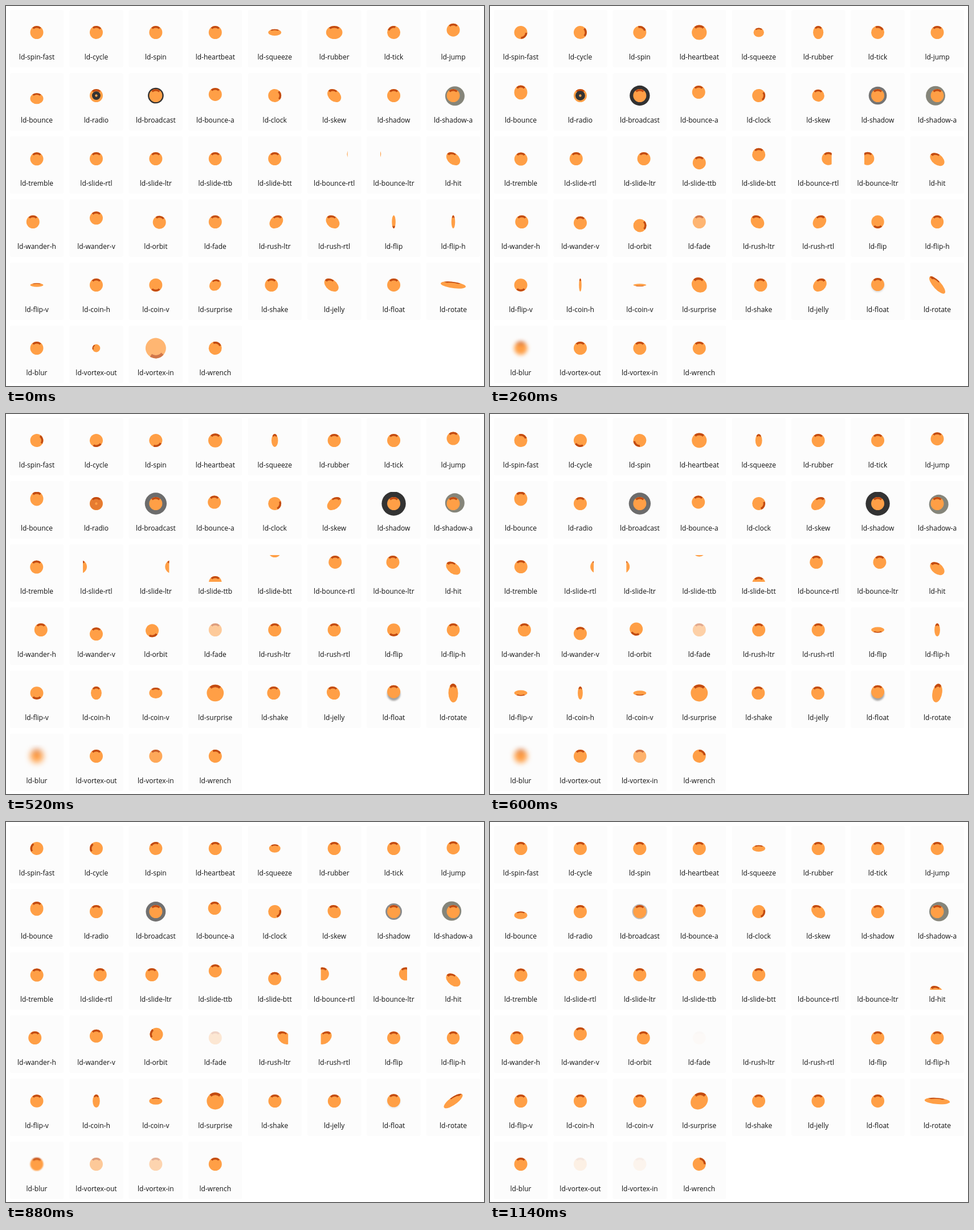
Animation of 839x668 px, one loop 1.16 s. Source, as an HTML page:

```html
<!DOCTYPE html>
<html lang="en">
<head>
<meta charset="utf-8">
<title>Transition gallery</title>
<style>
html, body { margin: 0; width: 100%; height: 100%; overflow: hidden; background: #fff; }
svg { display: block; width: 839px; height: 668px; }
text { font: 12px "Open Sans", "Noto Sans", sans-serif; fill: #111; text-anchor: middle; }
</style>
</head>
<body>
<svg id="stage" viewBox="0 0 839 668">
  <defs>
    <clipPath id="box"><rect x="-23.5" y="-20.5" width="47" height="47"/></clipPath>
  </defs>
</svg>
<script>
const LOOP = 1160, STEP = 20, TAU = Math.PI * 2;
const R = 11.5;
const { sin, cos, abs, exp, min, max, PI } = Math;

// Clocks: steady share of the loop, and a quicker one for eased motion
const clamp = v => max(0, min(1, v));
const share = t => .02 + t / LOOP;
const quick = t => clamp(t / 1020 - .035);

// Shapes over time
const easeInOut = (u, n) => u < .5 ? (2 * u) ** n / 2 : 1 - (2 - 2 * u) ** n / 2;
const easeOut = (u, n) => 1 - (1 - clamp(u)) ** n;
const bump = (t, mid, width) => exp(-(((t - mid) / width) ** 2));
const plateau = (t, mid, width) => exp(-(abs((t - mid) / width) ** 3));

const turn = t => easeInOut(quick(t), 2.3);
const wave = t => cos(TAU * quick(t));
const spring = t => cos(TAU * (t - 20) / 400) * exp(-((t / 500) ** 8));
const shake = t => -5.8 * exp(-t / 450) * cos(TAU * t / 520);
const wander = t => -7.3 * cos(TAU * (t + 75) / LOOP);
const across = t => 35.3 - 72 * share(t);
const arch = t => -8.2 * abs(cos(TAU * share(t)));
const exit = t => .12 * max(0, t - 740);
const lift = t => bump(t, 550, 300);
const vortex = t => max(0, 1 - t / 240) ** 2;
const gray = g => `rgb(${g},${g},${g})`;
const both = s => ({ sx: s, sy: s });

// Accelerates out of one side, then brakes in from the other
function slide(t) {
  const u = min(1, (t + 8) / 1148);
  return u < .5 ? 33 * (2 * u) ** 2 : -33 * (2 - 2 * u) ** 2;
}

const circle = (t, r, n = 1) => ({
  x: r * cos(TAU * n * share(t)),
  y: r * sin(TAU * n * share(t))
});

function jump(t) {
  return { y: -4.3 * (1 - (t / LOOP) ** 2) * abs(cos(PI * t / 520)) };
}

function bounce(t) {
  const v = abs(t - 560) / 580;
  return { y: -8.5 + 15 * v ** 2.5, sy: 1.08 - .5 * v ** 20 };
}

function heartbeat(t) {
  return both(1 + .14 * bump(t, 260, 80) - .09 * bump(t, 420, 60) + .14 * bump(t, 620, 120));
}

// Dark disc that widens, reddens and fades
function radio(t) {
  const u = clamp((t - 260) / 160);
  const mix = (a, b) => a + (b - a) * u;
  return {
    r: min(R, 7.5 + 2.5 * (t / 420) ** 2),
    fill: `rgb(${mix(51, 194)},${mix(51, 74)},${mix(51, 18)})`,
    o: 1 - clamp((t - 420) / 170)
  };
}

function broadcast(t) {
  const level = (t < 340 ? 50 : 108) + 80 * clamp((t - 800) / 340) ** 2;
  return { r: 13.2 + 6 * abs(sin(PI * share(t))) ** .8, fill: gray(level) };
}

function glow(t) {
  const g = plateau(t, 550, 320);
  return { r: 11 + 10.2 * g, fill: gray(51 + 150 * (1 - g) ** 1.3) };
}

function rush(t, dir) {
  return {
    x: dir * (2.8 * spring(t) + exit(t)),
    k: dir * (.45 * min(1, exit(t) / 20) - .28 * spring(t))
  };
}

// Two half turns, each braking
const flipA = t => PI * easeOut((t + 110) / 580, 2.5);
const flipB = t => PI * easeOut((t - 505) / 580, 2.5);
const flip = t => cos(flipA(t) + flipB(t));

// Two and a half turns, running down
function coin(t) {
  const p = t / LOOP;
  return cos(5 * PI * (1 - p) ** 2.05 * (1 + .9 * p * (1 - p)));
}

function hit(t) {
  const p = t / 1140;
  return { y: 5 * p + 26 * p ** 6, k: .45 - .1 * exp(-t / 80) };
}

function rotate(t) {
  const c = cos(TAU * share(t));
  return { ax: 180 * share(t) + 4, sx: 1.68 + .25 * c, sy: .61 - .13 * c };
}

function surprise(t) {
  return {
    ...both(1.3 - .42 * bump(t, 0, 260)),
    k: -.18 * spring(t) - .2 * bump(t, LOOP, 60)
  };
}

function wrench(t) {
  return { rot: 22 * exp(-t / 80) + 38 * bump(t, 600, 90) + 50 * bump(t, LOOP, 90) };
}

// x, y shift; rot spin; sx, sy scale; k slant; ax squash axis; o opacity
const moves = {
  'spin-fast': t => ({ rot: 1800 * turn(t) }),
  'cycle': t => ({ rot: 360 * share(t) }),
  'spin': t => ({ rot: 360 * turn(t) }),
  'heartbeat': heartbeat,
  'squeeze': t => ({ sx: .75 + .25 * wave(t), sy: .75 - .25 * wave(t) }),
  'rubber': t => ({ sx: 1 + .26 * spring(t) }),
  'tick': t => ({ rot: -26 * spring(t) }),
  'jump': jump,

  'bounce': bounce,
  'radio': t => ({ disc: radio(t) }),
  'broadcast': t => ({ ring: broadcast(t) }),
  'bounce-a': t => ({
    x: -1.6 * sin(PI * t / LOOP),
    y: -1.5 - 4.5 * abs(sin(TAU * share(t)))
  }),
  'clock': t => ({ rot: 86 + 29 * min(1, t / 620) }),
  'skew': t => ({ k: .37 * wave(t) - .05, ...both(1 - .08 * bump(t, 230, 100)) }),
  'shadow': t => ({ ring: glow(t) }),
  'shadow-a': t => ({ ring: { r: 17, fill: '#85857a', ...circle(t, 3, 2) } }),

  'tremble': t => ({ x: .3 * sin(t * 1.7), y: .3 + .3 * sin(t * 2.3) }),
  'slide-rtl': t => ({ x: -slide(t) }),
  'slide-ltr': t => ({ x: slide(t) }),
  'slide-ttb': t => ({ y: slide(t) }),
  'slide-btt': t => ({ y: -slide(t) }),
  'bounce-rtl': t => ({ x: across(t), y: arch(t) }),
  'bounce-ltr': t => ({ x: -across(t), y: arch(t) }),
  'hit': hit,

  'wander-h': t => ({ x: wander(t) }),
  'wander-v': t => ({ y: wander(t) }),
  'orbit': t => ({ ...circle(t, 6.4), rot: 360 * share(t) }),
  'fade': t => ({ o: max(.02, 1 - share(t)) }),
  'rush-ltr': t => rush(t, 1),
  'rush-rtl': t => rush(t, -1),
  'flip': t => ({ sx: abs(cos(flipA(t))), sy: -cos(flipB(t)) }),
  'flip-h': t => ({ sx: flip(t) }),

  'flip-v': t => ({ sy: flip(t) }),
  'coin-h': t => ({ sx: coin(t) }),
  'coin-v': t => ({ sy: coin(t) }),
  'surprise': surprise,
  'shake': t => ({ x: shake(t) }),
  'jelly': t => ({ x: .85 * shake(t), k: -.075 * shake(t) }),
  'float': t => ({
    y: -2.3 * lift(t),
    ring: { r: R, y: 2 * lift(t), fill: '#555', o: .55 * lift(t), blur: 1.4 }
  }),
  'rotate': rotate,

  'blur': t => ({ blur: 5.1 * plateau(t, 490, 330) }),
  'vortex-out': t => ({
    ...both(1 - .4 * vortex(t)), rot: -70 * vortex(t), o: clamp((1220 - t) / 630)
  }),
  'vortex-in': t => ({
    ...both(1 + .56 * vortex(t)), rot: 172 * vortex(t),
    o: min(.76 + t / 500, clamp((1200 - t) / 760))
  }),
  'wrench': wrench
};

const stage = document.getElementById('stage');
function set(el, attrs) {
  for (const a in attrs) el.setAttribute(a, attrs[a]);
  return el;
}
function add(parent, tag, attrs) {
  const el = document.createElementNS('http://www.w3.org/2000/svg', tag);
  return parent.appendChild(set(el, attrs));
}

const capR = R * .848, ex = capR * sin(.73), ey = capR * cos(.73);
const CAP = `M${-ex} ${-ey}A${capR} ${capR} 0 0 1 ${ex} ${-ey}`;

const cells = Object.entries(moves).map(([name, move], i) => {
  const x = 54 + 104.43 * (i % 8), y = 46.5 + 111 * Math.floor(i / 8);
  const cell = add(stage, 'g', { transform: `translate(${x} ${y})` });
  add(cell, 'rect', { x: -47.2, y: -39.5, width: 94.4, height: 101, rx: 3, fill: '#fcfcfc' });
  add(cell, 'text', { y: 47.5 }).textContent = 'ld-' + name;
  const view = add(cell, 'g', { 'clip-path': 'url(#box)' });
  const ring = add(view, 'circle', { r: 0 });
  const ball = add(view, 'g', {});
  add(ball, 'circle', { r: R, fill: '#ff9f46' });
  add(ball, 'path', { d: CAP, fill: 'none', stroke: '#c24b12', 'stroke-width': 3.5 });
  const disc = add(view, 'circle', { r: 0, fill: 'none' });
  return { move, ring, ball, disc };
});

const setBlur = (el, px) => { el.style.filter = px > .05 ? `blur(${px}px)` : 'none'; };

function drawBall(el, { x = 0, y = 0, rot = 0, sx = 1, sy = 1, k = 0, ax = 0, o = 1, blur = 0 }) {
  set(el, {
    transform: `translate(${x} ${y}) rotate(${ax}) matrix(1 0 ${k} 1 0 0) scale(${sx} ${sy}) rotate(${rot - ax})`,
    opacity: o
  });
  setBlur(el, blur);
}

function drawRing(el, { r, fill, x = 0, y = 0, o = 1, blur = 0 }) {
  set(el, { r, fill, cx: x, cy: y, opacity: o });
  setBlur(el, blur);
}

function drawDisc(el, { r, fill, o }) {
  const hole = 2.2;
  set(el, { r: (r + hole) / 2, 'stroke-width': r - hole, stroke: fill, opacity: o });
}

function draw(t) {
  for (const c of cells) {
    const s = c.move(t);
    drawBall(c.ball, s);
    if (s.ring) drawRing(c.ring, s.ring);
    if (s.disc) drawDisc(c.disc, s.disc);
  }
}

const start = performance.now();
function frame() {
  const t = (performance.now() - start) % LOOP;
  draw(Math.floor(t / STEP) * STEP);
  requestAnimationFrame(frame);
}
draw(0);
requestAnimationFrame(frame);
</script>
</body>
</html>
```
